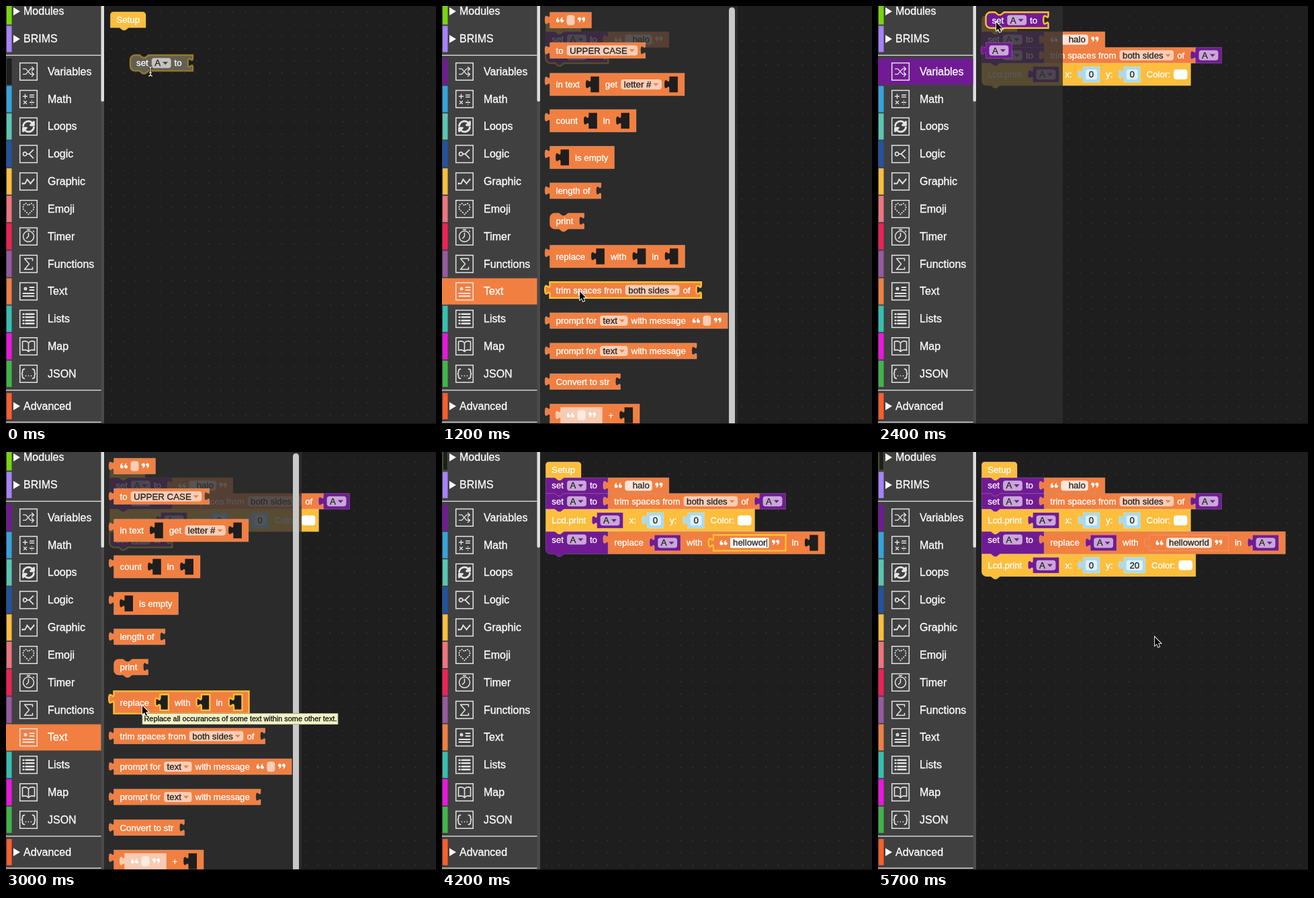
Recreate the animation shown at these times as an HTML page with a canvas. Size 640 px wide and 621 px high, loop 6 s.

```html
<!DOCTYPE html>
<html lang="en">
<head>
<meta charset="utf-8">
<title>Block editor</title>
<style>
html, body { margin: 0; width: 100%; height: 100%; overflow: hidden; background: #1e1e1e; }
canvas { display: block; width: 640px; height: 621px; }
</style>
</head>
<body>
<canvas id="stage" width="640" height="621"></canvas>
<script>
const ctx = document.getElementById('stage').getContext('2d');
const FACE = '"Liberation Sans", Arial, sans-serif';
const FONT = '13.3px ' + FACE, BIG = '16px ' + FACE;
const PURPLE = '#701b94', ORANGE = '#f17f41', YELLOW = '#fdbe3e', BLUE = '#a9daef', PALE = '#f8cbb3';
const GLOW = '#fdc22f', DARK = '#1e1e1e';
const LOOP = 6000, STEP = 300;
const ROW = 23.4, TALL = 33.3;
let ghost = false;

// ---------- helpers ----------
function rect(x, y, w, h, fill, r = 0) {
  ctx.fillStyle = fill;
  ctx.beginPath();
  ctx.roundRect(x, y, w, h, r);
  ctx.fill();
}

function label(str, x, y, fill = '#fff', font = FONT) {
  const base = y + parseFloat(font) * 0.34;
  ctx.font = font;
  ctx.fillStyle = ctx.strokeStyle = fill;
  ctx.lineWidth = 0.3;
  ctx.fillText(str, x, base);
  ctx.strokeText(str, x, base);
}

function textWidth(str) {
  ctx.font = FONT;
  return ctx.measureText(str).width;
}

// ---------- block definitions ----------
const pick = d => ({ type: 'pick', str: d });
const num = n => ({ type: 'num', str: n });
const quote = q => ({ type: 'quote', str: q });
const swatch = s => ({ type: 'swatch', str: s });
const slot = (block = null) => ({ type: 'slot', block });

const value = (color, items, extra) => ({ color, items, kind: 'value', ...extra });
const command = (color, items, extra) => ({ color, items, kind: 'command', ...extra });

const varA = (sel = false) => value(PURPLE, [pick('A')], { sel });
const text = (s, sel = false) => value(ORANGE, [quote(s)], { sel });
const shadowText = () => value(PALE, [quote('')]);
const number = (n = '0') => slot(value(BLUE, [num(n)]));
const setA = (ext, sel) => command(PURPLE, ['set', pick('A'), 'to'], { ext, sel });
const trim = (ext, sel) => value(ORANGE, ['trim spaces from', pick('both sides'), 'of'], { ext, sel });
const replace = (a, b, c, sel) =>
  value(ORANGE, ['replace', slot(a), 'with', slot(b), 'in', slot(c)], { sel });
const lcdPrint = (what, y = '0', sel = false) => command(YELLOW,
  ['Lcd.print', slot(what), 'x:', number(), 'y:', number(y), 'Color:', swatch('#fff')], { sel });
const setup = () => command(YELLOW, ['Setup'], { kind: 'hat' });

// Builds "Lcd.name a: 0 b: 0 ..." rows
function lcd(name, args, ...tail) {
  const items = [];
  args.split(' ').forEach((a, i) => items.push((i ? '' : 'Lcd.' + name + ' ') + a + ':', number()));
  return command(YELLOW, items.concat(tail));
}

// ---------- block layout ----------
const typeOf = item => typeof item === 'string' ? 'text' : item.type;
const isSoft = t => t === 'pick' || t === 'num' || t === 'swatch';
const edgePad = t => t === 'slot' ? 10 : t === 'num' ? 4 : isSoft(t) ? 5 : 9;

function gap(prev, t) {
  if (!prev) return t === 'slot' ? 16 : edgePad(t);
  if (t === 'slot') return isSoft(prev) ? 11.5 : 16.3;
  if (prev === 'slot') return isSoft(t) ? 5 : 9;
  if (prev === 'pick' && t === 'swatch') return 9;
  return t === 'quote' ? 9.5 : 5;
}

function itemWidth(item) {
  switch (typeOf(item)) {
    case 'text': return textWidth(item);
    case 'pick': return textWidth(item.str) + 20;
    case 'num': return textWidth(item.str) + 9.5;
    case 'quote': return Math.max(12, textWidth(item.str) + 8) + 32;
    case 'swatch': return 20.5;
    default: return item.block ? layout(item.block).w : 12.5;
  }
}

function layout(b) {
  let x = 0, prev = null, h = ROW;
  const spots = b.items.map(item => {
    const t = typeOf(item);
    x += gap(prev, t);
    const spot = { item, t, x };
    x += itemWidth(item);
    prev = t;
    if (t === 'slot') h = TALL;
    return spot;
  });
  if ('ext' in b) {
    x += gap(prev, 'slot');
    if (b.ext) h = Math.max(h, layout(b.ext).h);
  } else {
    x += edgePad(prev);
  }
  return { spots, w: x, h };
}

// ---------- block outlines ----------
function puzzle(x, y, up) {
  const p = [[4.5, 0], [13.6, 0], [-2.7, 1], [11.3, 1], [25.3, 1], [9.1, 0], [18.1, 0]]
    .map(([dy, out]) => [x - out * 7.3, y + dy]);
  if (up) p.reverse();
  ctx.lineTo(...p[0]);
  ctx.bezierCurveTo(...p[1], ...p[2], ...p[3]);
  ctx.bezierCurveTo(...p[4], ...p[5], ...p[6]);
}

function notch(x, y, back) {
  const p = [[13.6, 0], [18.6, 3.8], [22.2, 3.8], [27.2, 0]];
  if (back) p.reverse();
  p.forEach(([dx, dy]) => ctx.lineTo(x + dx, y + dy));
}

function trace(x, y, w, h, b) {
  const isValue = b.kind === 'value', hat = b.kind === 'hat';
  const top = hat ? 4.5 : isValue || b.joined ? 0 : 7;
  const low = isValue || hat || b.followed ? 0 : 7;
  ctx.beginPath();
  ctx.moveTo(x, y + top);
  ctx.arcTo(x, y, x + top, y, top);
  if (b.kind === 'command') notch(x, y);
  if (hat) ctx.arcTo(x + w, y, x + w, y + 5, 4.5);
  else ctx.lineTo(x + w, y);
  if ('ext' in b) puzzle(x + w, y);
  ctx.lineTo(x + w, y + h);
  if (!isValue) notch(x, y + h, true);
  ctx.lineTo(x + low, y + h);
  ctx.arcTo(x, y + h, x, y + h - low, low);
  if (isValue) puzzle(x, y, true);
  ctx.closePath();
}

function outline(sel) {
  ctx.lineWidth = sel || ghost ? 2.4 : 0.8;
  ctx.strokeStyle = ghost ? '#95792b' : sel ? GLOW : 'rgba(255,255,255,.24)';
  ctx.stroke();
}

function quoteMark(x, y, close) {
  ctx.save();
  ctx.translate(x + 6, y);
  if (close) ctx.rotate(Math.PI);
  ctx.fillStyle = '#fff';
  for (const dx of [-5.6, 0.6]) {
    ctx.beginPath();
    ctx.arc(dx + 2.5, 1.4, 2.5, -0.5, Math.PI);
    ctx.quadraticCurveTo(dx, -3.2, dx + 4.4, -4);
    ctx.quadraticCurveTo(dx + 2.4, -2.5, dx + 2.6, -1);
    ctx.fill();
  }
  ctx.restore();
}

function drawItem({ item, t, x: dx }, bx, by, h, b) {
  const x = bx + dx, mid = by + h / 2;
  const w = itemWidth(item);
  const fade = 'rgba(255,255,255,.62)';
  if (t === 'text') label(item, x, mid);
  if (t === 'swatch') rect(x, mid - 7.3, w, 14.6, item.str, 4);
  if (t === 'num') {
    rect(x, mid - 7.5, w, 15, fade, 3.5);
    label(item.str, x + 4.75, mid, '#222');
  }
  if (t === 'pick') {
    rect(x, mid - 7.5, w, 15, fade, 4);
    label(item.str, x + 4.5, mid, '#222');
    ctx.fillStyle = ghost ? '#444' : b.color;
    ctx.beginPath();
    ctx.moveTo(x + w - 12.5, mid - 1.8);
    ctx.lineTo(x + w - 4.5, mid - 1.8);
    ctx.lineTo(x + w - 8.5, mid + 2.5);
    ctx.fill();
  }
  if (t === 'quote') {
    const fill = b.editing ? '#fff' : item.str ? 'rgba(255,255,255,.8)' : fade;
    quoteMark(x, mid - 0.5);
    rect(x + 16, mid - 7.5, w - 32, 15, fill, b.editing ? 1 : 4);
    label(item.str, x + 20, mid, '#222');
    if (b.editing) rect(x + w - 19.5, mid - 6, 1, 12, '#222');
    quoteMark(x + w - 12, mid - 0.5, true);
  }
  if (t === 'slot') {
    const inset = (TALL - ROW) / 2;
    if (item.block) return draw(item.block, x, by + inset);
    trace(x, by + inset, w, ROW, { kind: 'value' });
    ctx.fillStyle = DARK;
    ctx.fill();
    if (b.sel) outline(true);
  }
}

function draw(b, x, y) {
  const { spots, w, h } = layout(b);
  trace(x, y, w, h, b);
  ctx.fillStyle = ghost ? '#636052' : b.color;
  ctx.fill();
  outline(b.sel);
  // Labels of a tall outer block stay on its first row
  const hasSlot = spots.some(s => s.t === 'slot');
  spots.forEach(s => drawItem(s, x, y, hasSlot ? h : ROW, b));
  if (b.ext) draw(b.ext, x + w, y);
  return h;
}

// ---------- workspace ----------
function stack(s) {
  const list = [setup()];
  if (s >= 1) list.push(setA(s >= 2 ? text('  halo') : null, s === 1));
  if (s >= 3) list.push(setA(s >= 5 ? trim(s >= 6 ? varA() : null, s === 5) : null, s < 5));
  if (s >= 7) list.push(lcdPrint(s >= 8 ? varA() : shadowText(), '0', s === 7));
  if (s >= 9) {
    const word = text({ 12: '', 13: 'hell', 14: 'hellowor' }[s] ?? 'helloworld', s >= 12 && s <= 14);
    word.editing = s === 13 || s === 14;
    const rep = replace(varA(), s >= 12 ? word : null, s >= 15 ? varA(s <= 16) : null, s === 11);
    list.push(setA(s >= 11 ? rep : null, s < 11));
  }
  if (s >= 17) list.push(lcdPrint(s >= 18 ? varA() : shadowText(), s >= 19 ? '20' : '0', s === 17));
  list.forEach((b, i) => {
    b.joined = i > 0;
    b.followed = i < list.length - 1;
  });
  return list;
}

function workspace(s) {
  const ox = s < 3 ? 1 : 0, oy = s < 3 ? -6 : 0;
  rect(146, 0, 494, 621, DARK);
  ctx.fillStyle = '#484848';
  for (let x = 155.2; x < 640; x += 18.14)
    for (let y = 14.3; y < 630; y += 18.14)
      ctx.fillRect(x + ox, y + oy, 1.2, 1.2);
  let y = 14.8 + oy;
  for (const b of stack(s)) y += draw(b, 154.3 + ox, y);
  if (s === 6) {
    ctx.beginPath();
    notch(154.3, y);
    ctx.lineWidth = 3;
    ctx.strokeStyle = GLOW;
    ctx.stroke();
  }
  const drag = { 0: [setA(null), 185, 73], 2: [setA(null), 181, 76], 6: [lcdPrint(text('')), 164.5, 93.5] }[s];
  if (drag) {
    ghost = true;
    draw(...drag);
    ghost = false;
  }
}

// ---------- flyouts ----------
const O = (items, extra) => value(ORANGE, items, extra);
const open = { ext: null };
const flyouts = {
  Variables: () => [[21, setA(null)], [66, varA()]],
  Text: () => [
    [21, text('')],
    [66, O(['to', pick('UPPER CASE')], open)],
    [116.5, O(['in text', slot(), 'get', pick('letter #'), slot()])],
    [170.5, O(['count', slot(), 'in', slot()])],
    [225, O([slot(), 'is empty'])],
    [274.5, O(['length of'], open)],
    [319.5, command(ORANGE, ['print'], open)],
    [372, replace(null, null, null)],
    [422, trim(null)],
    [467.5, O(['prompt for', pick('text'), 'with message', quote('')])],
    [512.5, O(['prompt for', pick('text'), 'with message'], open)],
    [558, O(['Convert to str'], open)],
    [608, O([slot(shadowText()), '+', slot()])]
  ],
  Graphic: () => [
    [21, command(YELLOW, ['Lcd.clear'])],
    [70, command(YELLOW, ['Lcd.fill', swatch('#000')])],
    [124, lcdPrint(shadowText())],
    [178, command(YELLOW, ['Font:', pick('FONT_Default')])],
    [232, lcd('pixel', 'x y', 'Color:', swatch('#fff'))],
    [291, lcd('line', 'x y x1 y1', 'Color:', swatch('#fff'))],
    [350, lcd('rect', 'x y width height', pick('color'), swatch('#fff'))],
    [409, lcd('triangle', 'x y x1 y1 x2 y2', pick('color'), swatch('#fff'))],
    [468, lcd('circle', 'x y radius', pick('color'), swatch('#fff'))],
    [527, lcd('ellipse', 'x y rx ry', pick('color'), swatch('#fff'))],
    [586, lcd('arc', 'x y radius thick start end', pick('color'), swatch('#fff'))]
  ]
};
const flyoutEdge = { Variables: 275, Text: 440, Graphic: 640 };

function flyout(name, hover) {
  rect(146, 0, flyoutEdge[name] - 146, 621, 'rgba(47,47,47,.8)');
  flyouts[name]().forEach(([mid, b], i) => {
    b.sel = i === hover;
    draw(b, 160.5, mid - layout(b).h / 2);
  });
  if (name === 'Text') rect(427, 2, 9, 630, '#c9c9c9', 4.5);
}

// ---------- sidebar ----------
// name, colour, icon path, icon line width
const categories = [
  ['Variables', PURPLE, 'M-8-4h4l7 8h4M-8 4h4l7-8h4M5-7l3 3-3 3M5 1l3 3-3 3', 1.4],
  ['Math', '#34a5dd', 'M-8-4h6M-5-7v6M2-6h6M2-3h6M-7 3l4 4M-3 3l-4 4M2 5h6M5 2.3v.1M5 7.7v.1', 1.4],
  ['Loops', '#5ac6b2', 'M-8-1a8 8 0 0 1 13-5M8-7v5h-5zM8 1a8 8 0 0 1-13 5M-8 7v-5h5z', 2.8],
  ['Logic', '#2153a0', 'M-8 0a2.7 2.7 0 1 0 5.4 0a2.7 2.7 0 1 0-5.4 0M-2 0h3l6-6M1 0l6 6M7-6v.1M7 6v.1', 1.7],
  ['Graphic', YELLOW, 'M-9 3h4l3-6 5 6 5-6M-9 2.5v1M-2-3.5v1M3 2.5v1M8-3.5v1', 1.9],
  ['Emoji', '#ef757e', 'M0 8L-8 0v-5l3-3h2l3 3 3-3h2l3 3v5z', 2],
  ['Timer', '#f32057', 'M-8 0a8 8 0 1 0 16 0a8 8 0 1 0-16 0M0-5v5l-3 3M-2-10h4M7-8l1 1', 1.5],
  ['Functions', '#975aa0', 'M6-5v-3h-12l7 8-7 8h12v-3', 1.5],
  ['Text', ORANGE, 'M-6-4a1.5 1.5 0 1 0 3 0a1.5 1.5 0 1 0-3 0M2-6h6M2-2h6M-8 3h16M-8 7h16', 2],
  ['Lists', '#35c0b1', 'M-8-7h1M-4-7h12M-8-2.5h1M-4-2.5h12M-8 2.5h1M-4 2.5h12M-8 7h1M-4 7h12', 2.4],
  ['Map', '#eb16df', 'M0-5q-3-4-9-2v13q6-2 9 2q3-4 9-2v-13q-6-2-9 2v13', 1.6],
  ['JSON', '#42b549', 'M-6-7q-3 0-3 3v2l-1 2 1 2v2q0 3 3 3M6-7q3 0 3 3v2l1 2-1 2v2q0 3-3 3M-4 3v.1M0 3v.1M4 3v.1', 1.7]
];

function group(name, y, color) {
  rect(1, y - 19.5, 7.5, 39, color);
  ctx.fillStyle = '#fff';
  ctx.beginPath();
  ctx.moveTo(11, y - 6);
  ctx.lineTo(21, y);
  ctx.lineTo(11, y + 6);
  ctx.fill();
  label(name, 26, y, '#fff', BIG);
}

function icon(path, width, y, dashed) {
  ctx.save();
  ctx.translate(33.5, y);
  ctx.strokeStyle = '#e4e4e4';
  ctx.lineWidth = 1.5;
  ctx.strokeRect(-12.8, -12.8, 25.6, 25.6);
  ctx.lineWidth = width;
  ctx.lineCap = 'round';
  ctx.lineJoin = 'round';
  if (dashed) ctx.setLineDash([0.2, 3.4]);
  ctx.stroke(new Path2D(path));
  ctx.restore();
}

function sidebar({ fly, hover, dark, idle }) {
  rect(0, 0, 142, 621, '#404040');
  rect(141.5, 0, 4.5, 621, '#4b4b4b');
  rect(141.5, -5, 4.5, 147, '#dedede', 2);
  group('Modules', 8, idle ? '#3f6418' : '#77d60c');
  if (idle) rect(2, 0, 6, 26.5, DARK);
  group('BRIMS', 49, '#a583fb');
  categories.forEach(([name, color, path, width], i) => {
    const y = 97.4 + i * 40.82;
    if (name === hover) rect(0, y - 19.5, 141.5, 39, '#e2e2e2');
    if (name === fly) rect(0, y - 19.5, 141.5, 39, color);
    rect(1, y - 19.5, 7.5, 39, name === dark ? DARK : color);
    icon(path, width, y, name === 'Emoji');
    label(name, 62, y, name === hover ? '#222' : '#fff', BIG);
  });
  group('Advanced', 594.5, '#fe5e2b');
  for (const y of [72.5, 570, 617.5]) rect(0, y, 141.5, 1.5, '#cfcfcf');
}

// ---------- pointer and tooltip ----------
function arrow(x, y) {
  ctx.save();
  ctx.translate(x, y);
  ctx.scale(0.86, 0.9);
  const p = new Path2D('M0 0V14L3.4 11L5.8 16.5L8.2 15.5L5.8 10.2H10.4Z');
  ctx.lineWidth = 2;
  ctx.strokeStyle = '#fff';
  ctx.stroke(p);
  ctx.fillStyle = '#000';
  ctx.fill(p);
  ctx.restore();
}

function beam(x, y) {
  const p = new Path2D(`M${x - 3} ${y - 7}q3 0 3 2.5v9q0 2.5-3 2.5M${x + 3} ${y - 7}q-3 0-3 2.5v9q0 2.5 3 2.5M${x - 2} ${y + 2}h4`);
  for (const [w, c] of [[2.8, '#222'], [1.2, '#eee']]) {
    ctx.lineWidth = w;
    ctx.strokeStyle = c;
    ctx.stroke(p);
  }
}

function tooltip(str, x, y) {
  rect(x, y, 292, 17, '#8d8d72');
  rect(x + 0.8, y + 0.8, 290.4, 15.4, '#f3f2c4');
  label(str, x + 3, y + 8.6, '#111', '10.9px ' + FACE);
}

// ---------- timeline ----------
const steps = [
  { dark: 'Variables', beam: [215, 97] },
  { fly: 'Text', on: 0, arrow: [188, 24] },
  { dark: 'Variables', beam: [211, 99] },
  { hover: 'Text', beam: [118, 410], idle: true },
  { fly: 'Text', on: 8, arrow: [205, 424] },
  { fly: 'Variables', on: 1, arrow: [170, 68] },
  { dark: 'Logic', beam: [182.5, 110] },
  { fly: 'Variables', hover: 'Variables', arrow: [92, 100] },
  { fly: 'Variables', on: 0, arrow: [176, 24] },
  { idle: true, beam: [176, 132] },
  { fly: 'Text', on: 7, arrow: [203, 377], tip: [202.5, 388] },
  { fly: 'Text', on: 0, arrow: [176, 24] },
  { idle: true, beam: [432, 137] },
  { idle: true },
  { idle: true },
  { fly: 'Variables', on: 1, arrow: [170, 68] },
  { fly: 'Graphic', hover: 'Graphic', arrow: [74, 258] },
  { idle: true, arrow: [186, 172] },
  { idle: true, beam: [380, 170] },
  { idle: true, arrow: [412, 275] }
];

function frame() {
  const s = Math.floor(performance.now() % LOOP / STEP);
  const now = steps[s];
  workspace(s);
  if (now.fly) flyout(now.fly, now.on);
  sidebar(now);
  rect(0, 620, 640, 1, '#120c0e');
  if (now.tip) tooltip('Replace all occurances of some text within some other text.', ...now.tip);
  if (now.arrow) arrow(...now.arrow);
  if (now.beam) beam(...now.beam);
  requestAnimationFrame(frame);
}
frame();
</script>
</body>
</html>
```
